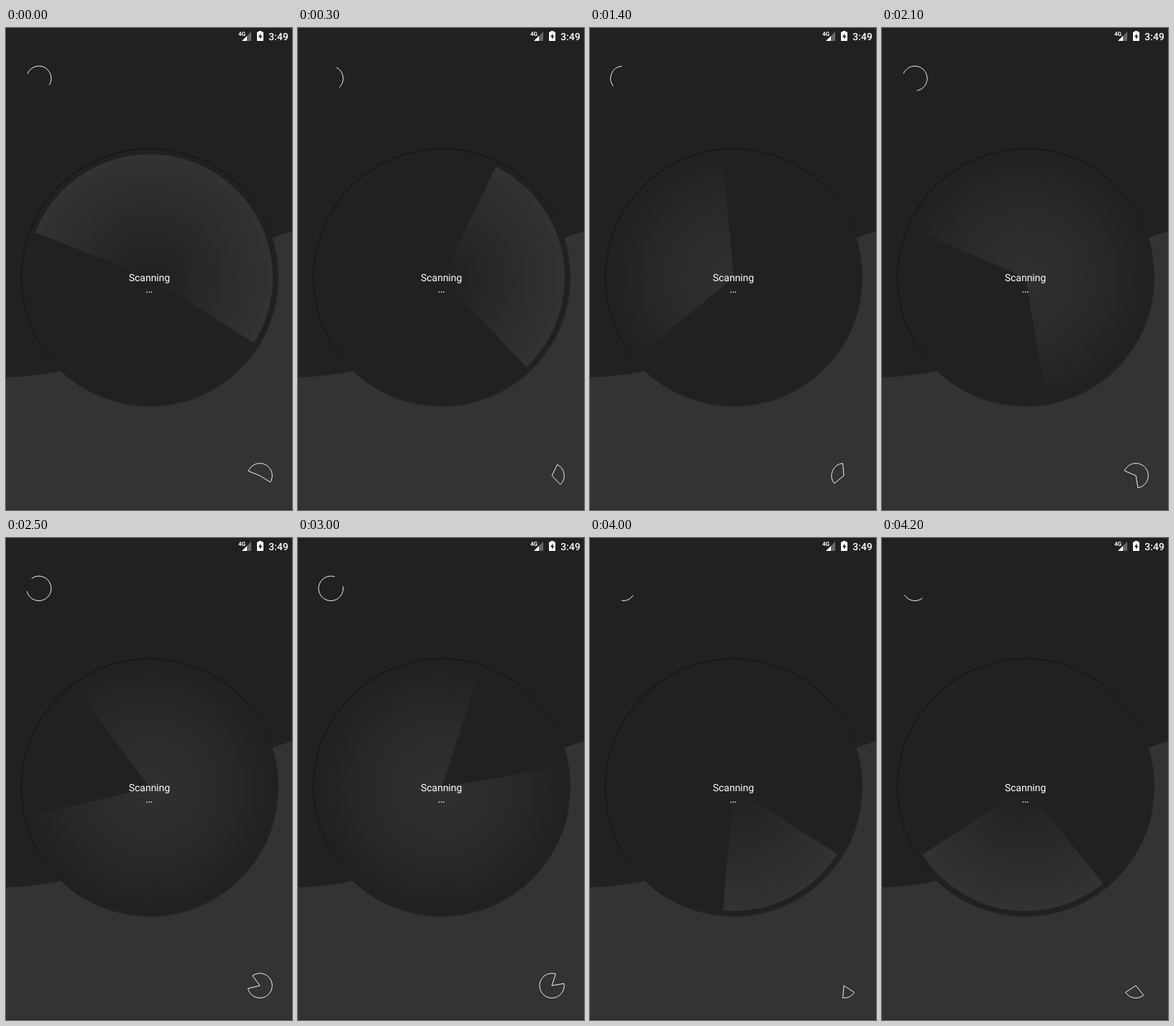
An HTML page that plays this animation: 400x672 px, repeating every 4.3 s.

```html
<!DOCTYPE html>
<html lang="en">
<head>
<meta charset="utf-8">
<title>Scanning</title>
<style>
  html, body { margin: 0; width: 100%; height: 100%; overflow: hidden; background: #212121; }
  svg { display: block; width: 400px; height: 672px; }
  text { font-family: Roboto, sans-serif; fill: #fff; text-rendering: geometricPrecision; }
  .line { fill: none; stroke: #f4f4f4; stroke-width: 1; }
</style>
</head>
<body>
<svg viewBox="0 0 400 672">
  <defs>
    <radialGradient id="rim" gradientUnits="userSpaceOnUse" cx="201" cy="348" r="172">
      <stop offset="0" stop-color="#202020"/>
      <stop offset="1" stop-color="#333"/>
    </radialGradient>
    <radialGradient id="core" gradientUnits="userSpaceOnUse" cx="201" cy="348" r="172">
      <stop offset="0" stop-color="#303030"/>
      <stop offset=".55" stop-color="#2a2a2a"/>
      <stop offset="1" stop-color="#212121"/>
    </radialGradient>
    <linearGradient id="edge" x2=".7" y2="1">
      <stop offset="0" stop-color="#161616"/>
      <stop offset=".5" stop-color="#191919"/>
      <stop offset=".8" stop-color="#252525"/>
    </linearGradient>
  </defs>

  <rect width="400" height="672" fill="#212121"/>
  <path d="M0 487Q45 485.500 78 478C200 450 260 330 372 293L400 283V672H0Z" fill="#333"/>
  <path d="M0 671.500H400" stroke="#272727"/>
  <circle cx="201" cy="347.700" r="179.500" fill="#212121" stroke="url(#edge)" stroke-width="1.800"/>

  <path id="beam"/>
  <path id="arc" class="line"/>
  <path id="pie" class="line"/>

  <g text-anchor="middle">
    <text x="200.500" y="353" font-size="14">Scanning</text>
    <text x="200.500" y="369" font-size="11" font-weight="700">...</text>
  </g>

  <path d="M330 18L343 5V18Z" fill="#666"/>
  <path d="M330 18L337 11V18Z" fill="#fff"/>
  <text x="325" y="10.500" font-size="8" font-weight="700">4G</text>
  <path d="M353.500 4H357.500V5.500H360V18H351V5.500H353.500Z" fill="#fff"/>
  <path d="M356.400 7.500L353 12.500H355.200V16L358.400 11H356.400Z" fill="#212121"/>
  <text x="367.300" y="17" font-size="14" font-weight="500">3:49</text>
</svg>
<script>
const LOOP = 4300, STEP = 100;
const MIN = 10, MAX = 298;       // sweep limits in degrees
const START = 449, CYCLE = 357;  // spin at the first minimum, spin per cycle
const GROW = 157, SHRINK = 72;   // spin taken by each phase

// The spin runs unevenly: [time, degrees]
const SPIN = [
  [0, 392], [600, 421], [700, 436], [1400, 511], [2100, 573],
  [2600, 611], [3000, 720], [3400, 752], [3700, 807], [4200, 853]
];
const [beam, arc, pie] = ['beam', 'arc', 'pie'].map(id => document.getElementById(id));

function spinAt(t) {
  const i = SPIN.findIndex(([time], k) => k && time >= t);
  const [[t0, a], [t1, b]] = [SPIN[i - 1], SPIN[i]];
  return a + (b - a) * (t - t0) / (t1 - t0);
}

// The head runs ahead while the sweep grows, then the tail catches up.
function poseAt(spin) {
  const cycle = Math.floor((spin - START) / CYCLE);
  const x = spin - START - cycle * CYCLE;
  const left = CYCLE - x;
  const shrinking = left < SHRINK;
  const part = shrinking ? (left / SHRINK) ** 2 : Math.min(1, x / GROW);
  const sweep = MIN + (MAX - MIN) * part;
  const base = spin + cycle * (MAX - MIN) - MIN;
  const tail = shrinking ? base + MAX - sweep : base;
  return { tail, head: tail + sweep, fill: cycle % 2 ? 'rim' : 'core' };
}

function sector(cx, cy, r, { tail, head }, closed) {
  const point = deg => {
    const a = deg * Math.PI / 180;
    return `${(cx + r * Math.cos(a)).toFixed(2)} ${(cy + r * Math.sin(a)).toFixed(2)}`;
  };
  const start = closed ? `M${cx} ${cy}L` : 'M';
  const large = head - tail > 180 ? 1 : 0;
  return `${start}${point(tail)}A${r} ${r} 0 ${large} 1 ${point(head)}${closed ? 'Z' : ''}`;
}

// The picture advances in steps and skips every fourth one late in the loop.
function snap(t) {
  const s = Math.floor(t / STEP) * STEP;
  return s >= 2700 && (s - 2700) % 400 === 0 ? s - STEP : s;
}

function draw(now) {
  const pose = poseAt(spinAt(snap(now % LOOP)));
  beam.setAttribute('d', sector(201, 348, 172, pose, true));
  beam.setAttribute('fill', `url(#${pose.fill})`);
  arc.setAttribute('d', sector(46, 70.3, 17.2, pose, false));
  pie.setAttribute('d', sector(355.1, 624.1, 17.2, pose, true));
}

const began = performance.now();
function tick() {
  draw(performance.now() - began);
  requestAnimationFrame(tick);
}
tick();
</script>
</body>
</html>
```
